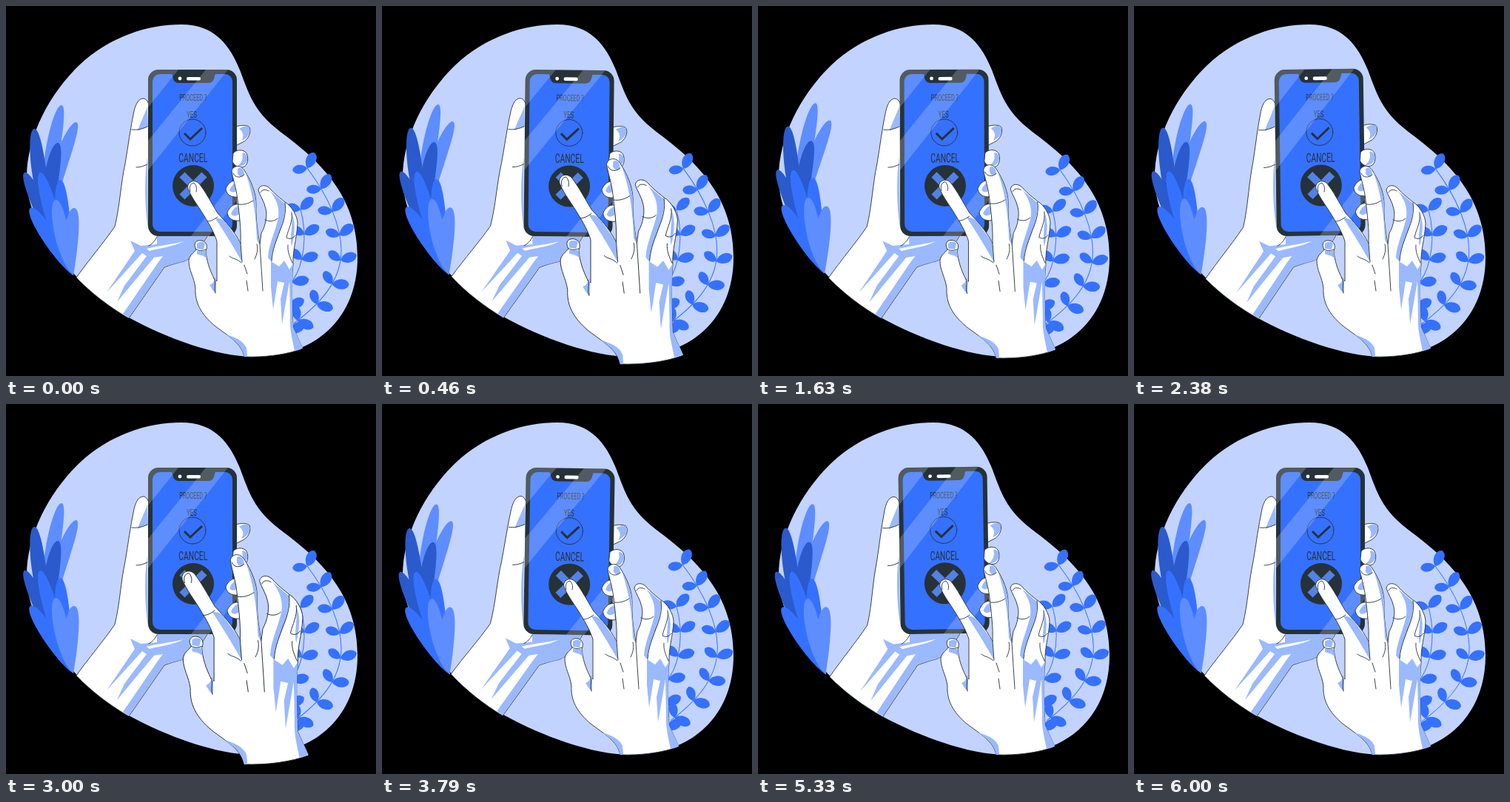
An HTML page for the animation above (6040 ms loop, 500 by 500 pixels).

```html
<!DOCTYPE html>
<html lang="en">
<head>
<meta charset="utf-8">
<title>Proceed or cancel</title>
<style>
html, body { margin: 0; width: 100%; height: 100%; overflow: hidden; background: #000; }
svg { display: block; width: 100vw; height: 100vh; }
.bg { fill: #c2d3ff; }
.blue { fill: #3571ff; }
.light { fill: #5d8dff; }
.deep { fill: #2a5acc; }
.dark { fill: #263238; }
.skin { fill: #fff; stroke: #263238; stroke-width: .9; stroke-linejoin: round; }
.shade { fill: #9ab9ff; }
.line { fill: none; stroke: #263238; stroke-width: .9; stroke-linecap: round; }
.stem { fill: none; stroke: #3571ff; }
.glare { fill: #fff; opacity: .2; }
text { font-family: Roboto, "Liberation Sans", sans-serif; fill: #263238; text-anchor: middle; }
</style>
</head>
<body>
<svg viewBox="0 0 500 500">
  <path class="bg" d="M237 25C282 25 303 53 317 89C331 127 338 146 376 174C431 215 475 262 475 340C475 420 420 474 335 474C285 474 215 448 166 421C110 388 28 312 28 232C28 175 60 117 100 79C140 42 190 25 237 25Z"/>

  <g id="plants">
    <path class="stem" d="M407 219C438 260 453 300 453 330C453 372 425 402 389 429"/>
    <path class="stem" d="M398 275C408 310 402 350 388 370C380 390 382 420 384 448"/>
  </g>

  <g id="holder">
    <path class="skin" d="M95 367C112 343 132 320 147 298C154 270 155 240 161 213C165 190 168 165 173 142C176 130 180 125 186 125C191 126 193 132 194 138L200 200L272 311C262 328 250 344 236 346C225 349 219 351 214 353L166 422C140 407 115 388 95 367Z"/>
    <path class="shade" d="M191 136C187 148 181 158 178 169C184 165 188 165 192 163ZM191 205C187 230 187 270 192 300ZM168 317L182 324L204 322V311H271C262 328 250 344 236 346L214 352L166 421L158 416L206 346L212 338L200 340L150 400L160 378L190 338L184 334L136 387L174 331Z"/>
    <path fill="#fff" d="M190 328C205 324 225 322 240 318C225 326 207 327 194 331Z"/>
    <path class="line" d="M170 167C177 168 185 166 191 163M176 218C182 218 187 216 191 214M204 312C201 318 198 321 193 324"/>
    <path class="skin" d="M308 164C314 161 326 160 329 164C332 171 327 181 320 184C316 186 312 188 308 190Z"/>
    <path class="shade" d="M315 166C320 162 327 161 329 165C331 172 326 179 318 182C322 176 321 170 315 166Z"/>

    <rect class="dark" x="192" y="86" width="120" height="225" rx="14"/>
    <rect class="blue" x="198" y="92" width="108" height="213" rx="10"/>
    <path class="dark" d="M224 91H283C281 98 281 104 273 104H234C226 104 226 98 224 91Z"/>
    <circle cx="235" cy="98" r="2.4" fill="#fff"/>
    <rect x="244" y="96" width="19" height="4.6" rx="2" fill="#fff"/>

    <!-- condensed lettering -->
    <g transform="translate(252.8) scale(.6 1)">
      <text y="128" font-size="12.2">PROCEED ?</text>
      <text x="-3" y="151" font-size="13">YES</text>
      <text y="211.5" font-size="17.2">CANCEL</text>
    </g>
    <circle class="line" cx="252" cy="171" r="18"/>
    <path d="M241 172L249 180L265 165" fill="none" stroke="#263238" stroke-width="3"/>
    <circle class="dark" cx="253" cy="243" r="28"/>
    <path d="M238 228L268 258M268 228L238 258" stroke="#5381e6" stroke-width="10"/>
    <path class="glare" d="M204 86H233L192 137V100Q192 88 204 86ZM270 86H300L192 222V182ZM312 231V263L274 311H250Z"/>

    <path class="skin" d="M307 199C311 194 321 193 325 199C328 205 327 214 322 217C316 220 308 216 306 210Z"/>
    <path class="shade" d="M319 199C323 197 327 202 326 208C324 215 318 218 313 216C319 212 321 205 319 199Z"/>
    <g id="fingertip">
      <path class="skin" d="M313 236C305 235 300 240 297 247C298 255 304 259 314 258Z"/>
      <path class="shade" d="M313 238C308 239 304 243 302 249C305 253 309 252 313 249Z"/>
    </g>
    <use href="#fingertip" x="2" y="32"/>
  </g>

  <g id="tapper">
    <path class="skin" d="M322 474C318 455 300 446 282 432C263 416 255 400 256 381C254 366 247 357 247 344C248 336 254 334 257 329C252 320 258 316 264 317C271 318 273 325 270 331C271 344 275 356 281 368L285 372V318C282 308 275 295 271 289C262 273 251 260 246 247C244 238 254 233 261 240C269 250 277 265 286 280C296 291 308 303 317 321C318 302 315 280 313 262C311 245 306 232 305 223C307 215 317 214 322 222C331 236 338 252 338 268C337 290 341 310 343 322L345 307C351 297 353 283 351 274C349 264 343 256 341 249C342 241 352 241 357 247C364 255 371 260 377 265C386 270 394 284 394 294C393 315 387 330 388 350C385 375 387 410 388 434L401 463C380 471 350 475 322 474Z"/>
    <path class="shade" d="M283 287C290 286 294 289 298 294L317 321L319 346C310 330 300 313 283 287ZM324 226C332 240 338 256 338 268C337 290 341 310 343 324L339 316C338 290 336 260 324 226ZM357 250L377 267C378 285 372 300 364 321C360 332 358 340 360 347L354 340C355 322 364 305 368 286C370 270 364 260 357 250ZM386 280C391 290 391 305 386 325C383 313 388 297 386 280ZM358 345L369 352L376 344L383 356L388 348C386 375 387 410 388 434L401 462L390 466C387 450 383 438 384 420L383 372L373 430L371 396L376 374L367 372L361 410L358 380ZM258 331H270L271 341C266 336 262 337 258 335ZM275 377C279 376 281 372 284 366V388C279 385 278 381 275 377ZM298 444C308 447 321 452 325 462L326 474H322C319 459 310 453 298 444Z"/>
    <path class="shade" d="M258 321C261 318 267 318 269 321L267 329L258 328ZM313 220C318 216 322 222 322 228C318 232 314 230 313 226Z"/>
    <path class="line" d="M257 329C261 331 266 331 270 329M281 368C285 374 280 380 283 388M249 251C247 245 249 240 254 239C258 243 258 248 257 251M307 226C309 232 317 233 322 228M344 252C346 247 352 248 355 250M272 291C277 291 282 288 286 285M314 268C321 269 328 267 334 263M350 289C356 292 363 291 367 287M317 320L319 346M339 322C341 329 339 336 336 342M343 322L347 385M302 338C306 342 312 341 318 347M322 350L326 362M325 371L327 385M377 266C379 278 376 290 370 304C366 316 360 328 359 344M386 279C388 292 381 302 379 313C384 316 388 314 391 310M381 323C380 332 384 340 387 347"/>
  </g>
</svg>
<script>
const $ = id => document.getElementById(id);
const DEG = 180 / Math.PI;

// A leaf in unit length along its own axis, placed at its base
function leaf(x, y, angle, length, halfWidth, color, bend = 0, tip = .9) {
  const w = halfWidth / length;
  $('plants').insertAdjacentHTML('beforeend',
    `<path class="${color}" transform="translate(${x} ${y}) rotate(${angle * DEG}) scale(${length})"
      d="M0 0C.25 ${bend - w} ${tip} ${-w} 1 0C${tip} ${w} .25 ${bend + w} 0 0Z"/>`);
}

// Pairs of leaves at even steps down each stem
for (const stem of document.querySelectorAll('.stem')) {
  for (let d = 0; d < stem.getTotalLength(); d += 34) {
    const a = stem.getPointAtLength(d), b = stem.getPointAtLength(d + 1), c = stem.getPointAtLength(d - 1);
    const up = Math.atan2(c.y - b.y, c.x - b.x);
    leaf(a.x, a.y, up + 1.08, 23, 9, 'blue');
    leaf(a.x, a.y, up - 1.08, 20, 8, 'blue');
  }
}

// Blades fan out of one root; those leaning right bow more
function blades(x, y, color, tips) {
  for (const [tx, ty] of tips) {
    const angle = Math.atan2(ty - y, tx - x);
    leaf(x, y, angle, Math.hypot(tx - x, ty - y), 13, color, -.2 * (Math.cos(angle) + .5), 1);
  }
}
blades(62, 300, 'light', [[75, 134], [95, 157]]);
blades(62, 300, 'deep', [[38, 166], [70, 185]]);
blades(91, 364, 'deep', [[25, 225]]);
blades(91, 364, 'blue', [[46, 225], [73, 235], [33, 273]]);
blades(91, 364, 'light', [[67, 262], [92, 273]]);

// Linear interpolation through [position, value] stops
function track(p, stops) {
  const i = Math.max(1, stops.findIndex(s => s[0] >= p));
  const [a, from] = stops[i - 1], [b, to] = stops[i];
  return from + (to - from) * (p - a) / (b - a);
}
const sway = p => track(p, [[0, 0], [.25, 1], [.75, -1], [1, 0]]);
const beat = p => track(p, [[0, 1], [.1, 1.1], [.3, 1], [.4, 1], [.5, 1.1], [.6, 1], [1, 1]]);

function draw(now) {
  const p = Math.min(now % 6040, 6000) / 6000;
  $('plants').setAttribute('transform', `rotate(${sway(p)} 249 293)`);
  $('holder').setAttribute('transform', `rotate(${sway(p * 2 % 1)} 212 254)`);
  $('tapper').setAttribute('transform',
    `translate(324 345) scale(${beat(p)}) translate(-324 -345)`);
  requestAnimationFrame(draw);
}
draw(0);
</script>
</body>
</html>
```
